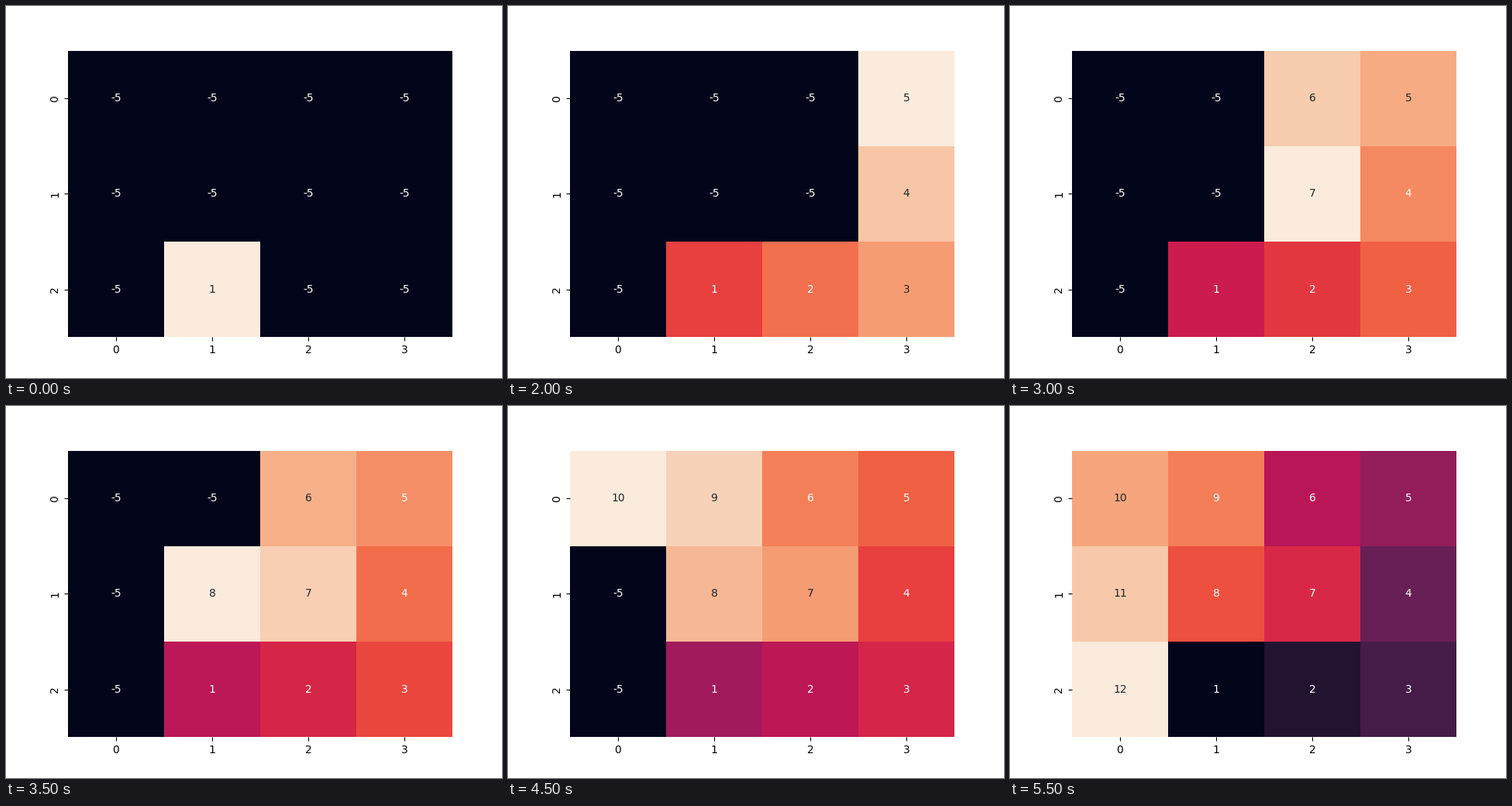
A matplotlib script for the animation above (7.5 s loop, 640 by 480 pixels).

```python
import numpy as np
import matplotlib.pyplot as plt
from matplotlib.animation import FuncAnimation
from matplotlib.colors import LinearSegmentedColormap

ROWS, COLS = 3, 4
EMPTY = -5
STEP_MS, FRAMES = 500, 15
PATH = [(2, 1), (2, 2), (2, 3), (1, 3), (0, 3), (0, 2),
        (1, 2), (1, 1), (0, 1), (0, 0), (1, 0), (2, 0)]

# Colour stops at k/n for each divisor n
STOPS = {
    1: "#03051a #faebdd",
    5: "#4c1d4b #a11a5b #e83f3f #f69c73",
    6: "#3f1b43 #841e5a #cb1b4f #f06043 #f6aa82",
    7: "#35193e #701f57 #ad1759 #e13342 #f37651 #f6b48f",
    8: "#2c1637 #611f53 #981b5b #cb1b4f #ec4c3e #f58860 #f6bc99",
    11: "#221331 #451c47 #691f55 #921c5b #b91657 "
        "#d92847 #ed503e #f47d57 #f6a47c #f7c9aa",
}


def make_cmap():
    stops = {}
    for n, colors in STOPS.items():
        for k, color in enumerate(colors.split(), start=0 if n == 1 else 1):
            stops[k / n] = color
    return LinearSegmentedColormap.from_list("ember", sorted(stops.items()))


def luminance(rgb):
    rgb = np.asarray(rgb)
    linear = np.where(rgb <= 0.03928, rgb / 12.92, ((rgb + 0.055) / 1.055) ** 2.4)
    return linear @ [0.2126, 0.7152, 0.0722]


def grid_at(step):
    grid = np.full((ROWS, COLS), EMPTY)
    for value, cell in enumerate(PATH[:step + 1], start=1):
        grid[cell] = value
    return grid


plt.rcParams["font.family"] = "DejaVu Sans"
fig, ax = plt.subplots(figsize=(6.4, 4.8), dpi=100)
mesh = ax.pcolormesh(grid_at(0), cmap=make_cmap())
ax.set(xlim=(0, COLS), ylim=(ROWS, 0))
ax.set_xticks(np.arange(COLS) + 0.5, range(COLS))
ax.set_yticks(np.arange(ROWS) + 0.5, range(ROWS), rotation="vertical", va="center")
ax.spines[:].set_visible(False)
labels = {(r, c): ax.text(c + 0.5, r + 0.5, "", ha="center", va="center")
          for r in range(ROWS) for c in range(COLS)}


def update(i):
    grid = grid_at(i)
    mesh.set_array(grid)
    mesh.set_clim(grid.min(), grid.max())
    for cell, label in labels.items():
        rgb = mesh.to_rgba(grid[cell])[:3]
        label.set_text(str(grid[cell]))
        label.set_color(".15" if luminance(rgb) > 0.408 else "w")
    return [mesh, *labels.values()]


anim = FuncAnimation(fig, update, frames=FRAMES, interval=STEP_MS, repeat=True)
plt.show()
```
